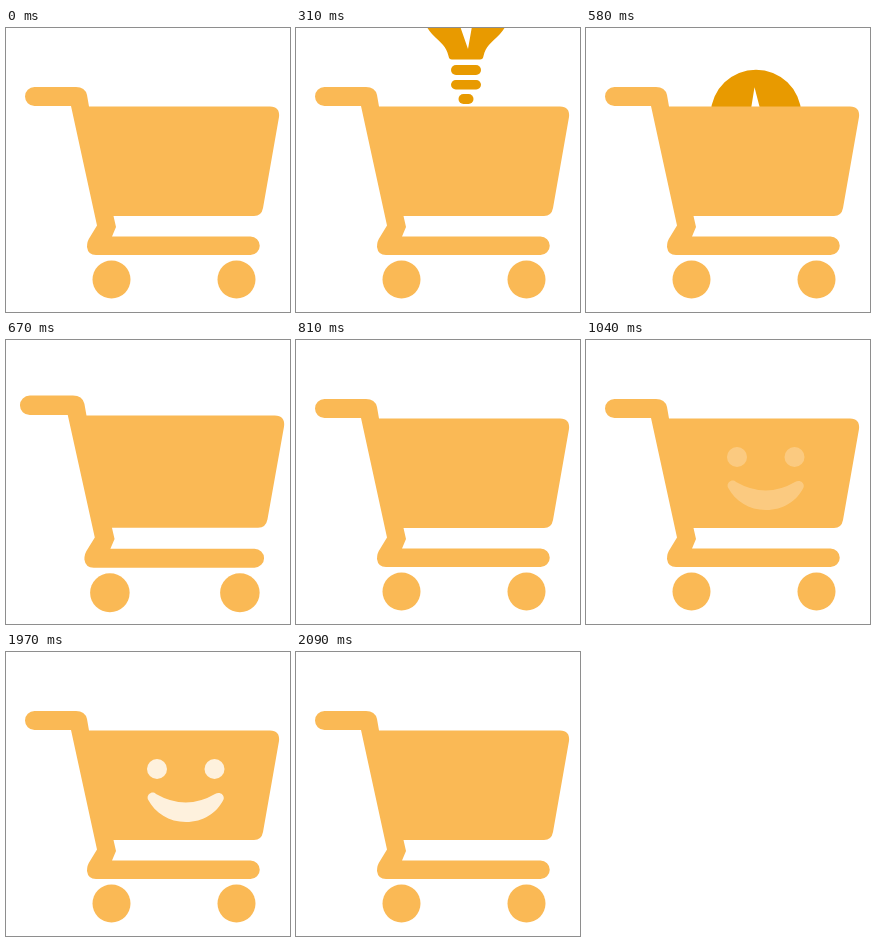
Animation, 284 px wide and 284 px high, one loop 2320 ms. Source, as an HTML page:

```html
<!DOCTYPE html>
<html lang="en">
<head>
<meta charset="utf-8">
<title>Happy cart</title>
<style>
  html, body { margin: 0; height: 100%; overflow: hidden; background: #fff; }
  svg { display: block; width: 100vw; height: 100vh; }
</style>
</head>
<body>
<svg viewBox="0 0 284 284">
  <clipPath id="above"><path d="M0 0H284V120H0Z"/></clipPath>
  <g clip-path="url(#above)">
    <g id="bulb" fill="#e89a00">
      <path d="M-34 30A45.4 45.4 0 1 1 34 30C24 40 20 42 17.5 52Q17 55.5 14 55.5H-14Q-17 55.5 -17.5 52C-20 42 -24 40 -34 30Z"/>
      <path fill="#fff" d="M-1.5 -28L6 1L15 20L6.5 19.5L2 45L-14 -1L-6 0Z"/>
      <rect x="-15" y="61" width="30" height="10" rx="5"/>
      <rect x="-15" y="76" width="30" height="9.5" rx="4.75"/>
      <rect x="-7.5" y="90" width="15" height="10" rx="5"/>
    </g>
  </g>
  <g id="cart" fill="#fab955">
    <path d="M28.5 59H70Q79 59 81 67L83 78.5H264Q274 78.5 273 89L257 180Q255.5 188 248 188H107.5L110 199L106 208.5H244.5a9.25 9.25 0 0 1 0 18.5H90Q82 227 81 219Q81 213 84 209L91 197.5L65 78H28.5a9.5 9.5 0 0 1 0 -19Z"/>
    <circle cx="105.5" cy="251.5" r="19"/>
    <circle cx="230.5" cy="251.5" r="19"/>
    <g id="face" fill="#fff">
      <circle cx="151" cy="117" r="10"/>
      <circle cx="208.5" cy="117" r="10"/>
      <path d="M150 142Q180 159 209 142C214 139 219 143 217.5 147.5C211 161 197 170 180 170C163 170 149 161 142 147.5C140 143 146 138 150 142Z"/>
    </g>
  </g>
</svg>
<script>
  const LOOP = 2320;
  const [bulb, cart, face] = ['bulb', 'cart', 'face'].map(id => document.getElementById(id));
  const clamp = v => Math.min(1, Math.max(0, v));
  // number of steps of the given length begun since start
  const steps = (t, start, length) => Math.floor((t - start) / length) + 1;

  function bulbY(t) {
    const u = steps(t, 70, 30) * 30 - 270;
    return -24 + 0.355 * u + 0.00021 * u * u;
  }

  function bounce(t) {
    const rise = Math.sin(clamp(steps(t, 610, 30) / 3) * Math.PI / 2);
    const fall = clamp(steps(t, 740, 70) / 2);
    return rise * (1 - fall);
  }

  function smile(t) {
    return clamp(steps(t, 1040, 76) / 4) - clamp(steps(t, 1970, 30) / 5);
  }

  function draw(now) {
    const t = now % LOOP, b = bounce(t);
    bulb.setAttribute('transform', `translate(170 ${bulbY(t)})`);
    cart.setAttribute('transform',
      `translate(146 200) scale(${1 + 0.04 * b} ${1 + 0.024 * b}) translate(-146 -200)`);
    face.setAttribute('opacity', smile(t));
  }

  let start;
  function frame(now) {
    start ??= now;
    draw(now - start);
    requestAnimationFrame(frame);
  }
  draw(0);
  requestAnimationFrame(frame);
</script>
</body>
</html>
```
